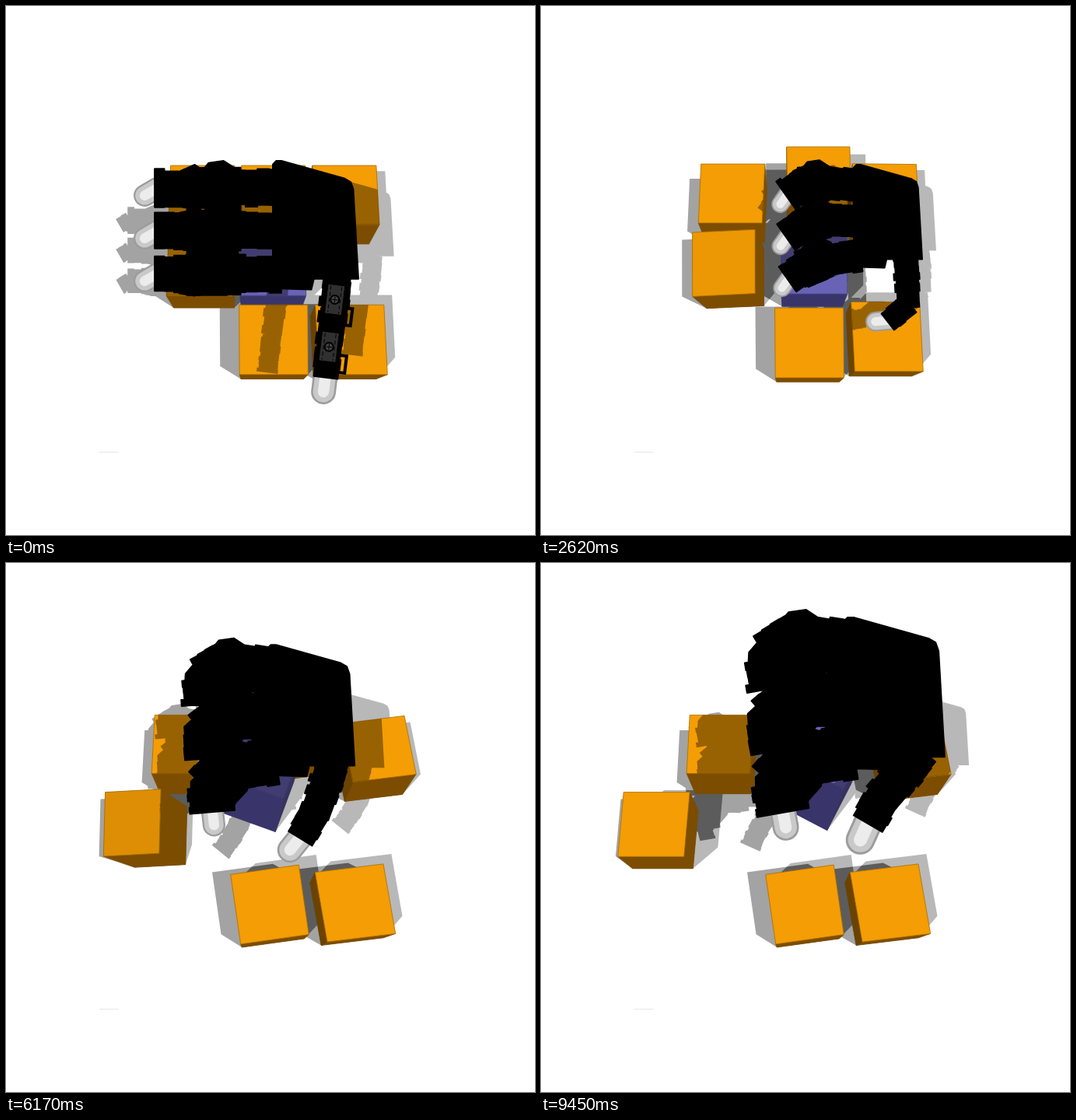
These frames come from a looping animation (680 by 680 pixels, 9510 ms). An HTML page:

```html
<!DOCTYPE html>
<html lang="en">
<head>
<meta charset="utf-8">
<title>Robot hand over cubes</title>
<style>
html, body { margin: 0; width: 100%; height: 100%; overflow: hidden; background: #fff; }
svg { display: block; width: 100%; height: 100%; isolation: isolate; }
.cast { mix-blend-mode: difference; }
</style>
</head>
<body>
<svg id="stage" viewBox="0 0 680 680">
  <defs><clipPath id="tops"><path id="topClip"/></clipPath></defs>
  <rect width="680" height="680" fill="#fff"/>
  <path d="M120 573.5H144" stroke="#e6e6e6"/>
</svg>
<script>
const LOOP = 9510, STEP = 59.4, END = 9450;
const stage = document.getElementById('stage');
const topClip = document.getElementById('topClip');

function add(tag, attrs, parent = stage) {
  const el = document.createElementNS('http://www.w3.org/2000/svg', tag);
  for (const k in attrs) el.setAttribute(k, attrs[k]);
  return parent.appendChild(el);
}

// Key poses are [time, ...values]; missing values are 0.
function pose(keys, t) {
  const n = keys.findIndex(k => k[0] > t);
  if (n < 0) return keys[keys.length - 1].slice(1);
  const a = keys[n - 1], b = keys[n], p = (t - a[0]) / (b[0] - a[0]);
  return Array.from({ length: Math.max(a.length, b.length) - 1 }, (_, i) => {
    const from = a[i + 1] || 0, to = b[i + 1] || 0;
    return from + (to - from) * p;
  });
}

const RAD = Math.PI / 180;
const noise = n => { const v = Math.sin(n * 127.1) * 43758.5; return v - Math.floor(v); };
const move = ([x, y], deg, len) => [x + Math.cos(deg * RAD) * len, y + Math.sin(deg * RAD) * len];
const area = p => p.reduce((s, a, i) => {
  const b = p[(i + 1) % p.length];
  return s + a[0] * b[1] - b[0] * a[1];
}, 0);
const path = p => 'M' + p.map(q => q[0].toFixed(1) + ' ' + q[1].toFixed(1)).join('L') + 'Z';
const solid = p => path(area(p) < 0 ? p.slice().reverse() : p);

function hull(points) {
  const s = points.slice().sort((a, b) => a[0] - b[0] || a[1] - b[1]);
  const half = list => {
    const h = [];
    for (const p of list) {
      while (h.length > 1 && area([h[h.length - 2], h[h.length - 1], p]) <= 0) h.pop();
      h.push(p);
    }
    h.pop();
    return h;
  };
  return half(s).concat(half(s.reverse()));
}

// Each lamp throws points towards its own vanishing point.
const LAMPS = [{ x: 73, y: 375, color: '#5c5c5c' }, { x: 580, y: 270, color: '#474747' }];
const cast = (p, lamp, h) => p.map(([x, y]) => [x + (lamp.x - x) * h, y + (lamp.y - y) * h]);

// Cube keys: time, centre of the top, yaw, roll, pitch.
const CUBES = [
  [[0, 251, 243], [2620, 245, 241], [4180, 230, 233]],
  [[0, 344, 243], [2620, 357, 218], [4180, 361, 221], [5300, 392, 232, -8], [7010, 385, 185, -8]],
  [[0, 437, 243], [4180, 447, 240, 1], [4940, 479, 239, -7]],
  [[0, 250, 331], [1790, 248, 329, -2], [4180, 210, 333, -4, 22], [5300, 178, 332, -6, 45], [7010, 145, 336]],
  [[0, 343, 331], [2620, 351, 329], [4180, 365, 306, 33], [5300, 318, 281, 20, 0, 22],
    [7010, 345, 222, 20, 0, 20], [END, 370, 238, 28, 0, 33]],
  [[0, 344, 429], [2620, 345, 433], [4180, 343, 463, -8, 0, -23], [4900, 339, 439, -8]],
  [[0, 444, 429], [2620, 445, 425], [4180, 449, 437, -7]]
].map((keys, i) => ({ keys, blue: i === 4 }));

// Hand keys: time, palm x y width, height, finger curl and reach, thumb angle, bend and length.
const HAND = [
  [0, 343, 199, 110, .36, 0, 1, 97, 0, 1.18],
  [950, 389, 208, 94, .23, 30, .7, 92, 35, 1.08],
  [1790, 395, 207, 92, .2, 35, .66, 90, 45, 1.05],
  [2620, 402, 204, 88, .2, 35, .65, 87, 55, 1.08],
  [4180, 383, 205, 84, .2, 45, .48, 82, -8, 1],
  [5300, 321, 156, 99, .25, 90, .62, 100, 14, .98],
  [7010, 352, 50, 127, .5, 100, .65, 120, 10, .9],
  [END, 389, 70, 130, .51, 100, .65, 130, -10, .86]
];
const PALM = [[0, .03], [.04, 0], [.1, 0], [.84, .15], [.91, .18], [.94, .24], [1, 1], [.48, 1], [.45, 1.09], [0, 1.08]];

// A machined link: a bar whose long sides step in and out.
function link(a, b, w, seed) {
  const dir = Math.atan2(b[1] - a[1], b[0] - a[0]) / RAD, len = Math.hypot(b[0] - a[0], b[1] - a[1]);
  const edge = s => Array.from({ length: 8 }, (_, i) => {
    const along = (i + 1 >> 1) / 4 * 1.16 - .08;
    return move(move(a, dir, len * along), dir + 90 * s, w * (.45 + .09 * noise(seed + s * 3 + (i >> 1))));
  });
  return edge(1).concat(edge(-1).reverse());
}
const knuckle = (c, r, seed) => Array.from({ length: 9 }, (_, i) => move(c, i * 40, r * (.88 + .24 * noise(seed + i))));

function fingerJoints(i, x, y, w, curl, reach) {
  const fan = 9 * (i - 1) * Math.min(1, curl / 40);
  const bends = [fan, fan + curl * .4, curl, 30 + curl * .7];
  const lengths = [.48, .54 * reach, .39 * reach, .17];
  const joints = [[x + .06 * w, y + (.32 + .5 * i) * w]];
  bends.forEach((b, k) => joints.push(move(joints[k], 180 - b, lengths[k] * w)));
  return joints;
}
function thumbJoints(x, y, w, angle, bend, len) {
  const joints = [[x + .76 * w, y + 1.33 * w]];
  [[0, .3], [0, .37], [1, .33], [1.6, .2 / len]].forEach(([b, part], k) =>
    joints.push(move(joints[k], angle + bend * b, part * len * w)));
  return joints;
}

const casts = LAMPS.map(l => add('path', { class: 'cast', fill: l.color }));
const cubeEls = CUBES.map(c => {
  const g = add('g', { 'stroke-linejoin': 'round', 'stroke-width': .8 });
  return {
    sides: [0, 1, 2, 3].map(() => add('path', {}, g)),
    top: add('path', { fill: c.blue ? '#6963b5' : '#f49d04', stroke: c.blue ? '#4b468c' : '#a96b00' }, g),
    tint: add('path', {}, g)
  };
});
const shade = add('path', { opacity: .38, 'clip-path': 'url(#tops)' });
const caps = [0, 1, 2, 3].map(() => ['#9c9c9c', '#c9c9c9', '#ececec'].map(stroke =>
  add('path', { fill: 'none', stroke, 'stroke-linecap': 'round' })));
const black = add('path', { stroke: '#000', 'stroke-width': 2, 'stroke-linejoin': 'round' });
const detail = add('g', { fill: 'none', stroke: '#000' });
const plates = [0, 1].map(() => {
  const g = add('g', {}, detail);
  add('rect', { x: -11, y: -19, width: 22, height: 38, fill: '#303030' }, g);
  add('path', { d: 'M-7 -17V17M7 -17V17', 'stroke-dasharray': '5 3' }, g);
  add('circle', { r: 5.5, fill: '#444', 'stroke-width': 2 }, g);
  add('path', { d: 'M-4 0H4M0 -4V4' }, g);
  add('path', { d: 'M14 9H24V31H16Z', 'stroke-width': 4 }, g);
  return g;
});

function drawCube(cube, els, t, ground) {
  const [x, y, yaw = 0, roll = 0, pitch = 0] = pose(cube.keys, t);
  const c = Math.cos(yaw * RAD), s = Math.sin(yaw * RAD);
  // Nearer the lower edge the camera sees tops more squarely.
  const w = (82 + (y - 243) * .033) * (1 - roll / 150) / 2, h = (76 + (y - 243) * .073) / 2;
  const skew = (x - 330) * .02;
  const top = [[-1, -1], [1, -1], [1, 1], [-1, 1]].map(([a, b]) =>
    [x + a * w * c + b * (skew - h * s), y + a * w * s + b * h * c]);
  const base = top.map(([a, b]) =>
    [a + (320 - a) * .085 + roll * c - pitch * s, b + (531 - b) * .1 + roll * s + pitch * c]);
  const tones = cube.blue ? ['#28254d', '#37335f', '#39356a', '#2c2955'] : ['#5a3900', '#7a4d00', '#7c4d00', '#6b4300'];
  els.sides.forEach((el, i) => {
    const j = (i + 1) % 4, face = [top[j], top[i], base[i], base[j]];
    el.setAttribute('d', area(face) > 0 ? path(face) : '');
    el.setAttribute('fill', tones[i]);
    el.setAttribute('stroke', tones[i]);
  });
  const d = path(top);
  els.top.setAttribute('d', d);
  els.tint.setAttribute('d', d);
  els.tint.setAttribute('opacity', roll / 250);
  LAMPS.forEach((l, i) => ground[i].push(solid(hull(cast(top, l, .11).concat(base)))));
  return d;
}

function drawCap(els, a, b, width) {
  els.forEach((el, i) => {
    el.setAttribute('d', 'M' + a + 'L' + b);
    el.setAttribute('stroke-width', width * [1, .84, .45][i]);
  });
}

function render(t) {
  const ground = [[], []], onTop = [], body = [];
  topClip.setAttribute('d', CUBES.map((c, i) => drawCube(c, cubeEls[i], t, ground)).join(''));

  const [x, y, w, high, curl, reach, angle, bend, len] = pose(HAND, t);
  const throwShape = (p, h) => LAMPS.forEach((l, i) => {
    ground[i].push(solid(cast(p, l, h)));
    onTop.push(solid(cast(p, l, Math.max(0, h - .08))));
  });
  const part = (p, h) => { body.push(solid(p)); throwShape(p, h); };

  part(PALM.map(([u, v]) => [x + u * w, y + v * w * 1.38]), high);

  const low = high * .82;
  for (let i = 0; i < 3; i++) {
    const j = fingerJoints(i, x, y, w, curl, reach), wide = w * (.42 + curl * .0012);
    [0, 1, 2].forEach(k => part(link(j[k], j[k + 1], wide * (k === 1 ? 1.16 : 1), i * 9 + k * 2), low));
    const top = [j[1][0] - .2 * w * (1 - curl / 100), j[1][1] - .07 * w];
    part(knuckle(top, w * .26, i * 11), low);
    part(knuckle(j[2], w * .25, i * 7 + 3), low);
    throwShape(link(j[3], j[4], w * .27, i), low);
    drawCap(caps[i], j[3], j[4], w * .26);
  }

  const th = thumbJoints(x, y, w, angle, bend, len);
  const thick = w * (.3 + high * .1 * Math.min(1, t / 900));
  [0, 1, 2].forEach(k => part(link(th[k], th[k + 1], thick * (1.1 - k * .05), 30 + k * 2), low));
  throwShape(link(th[3], th[4], thick, 30), low);
  drawCap(caps[3], th[3], th[4], w * .29);

  detail.setAttribute('opacity', Math.max(0, 1 - t / 500));
  plates.forEach((g, i) => {
    const [px, py] = move(th[i + 1], angle, w * .06 * (i * 2 - 1));
    g.setAttribute('transform', `translate(${px} ${py}) rotate(${angle - 90})`);
  });
  black.setAttribute('d', body.join(''));
  shade.setAttribute('d', onTop.join(''));
  casts.forEach((el, i) => el.setAttribute('d', ground[i].join('')));
}

const start = performance.now();
function tick() {
  const t = (performance.now() - start) % LOOP;
  render(Math.min(END, Math.floor(t / STEP) * STEP));
  requestAnimationFrame(tick);
}
tick();
</script>
</body>
</html>
```
